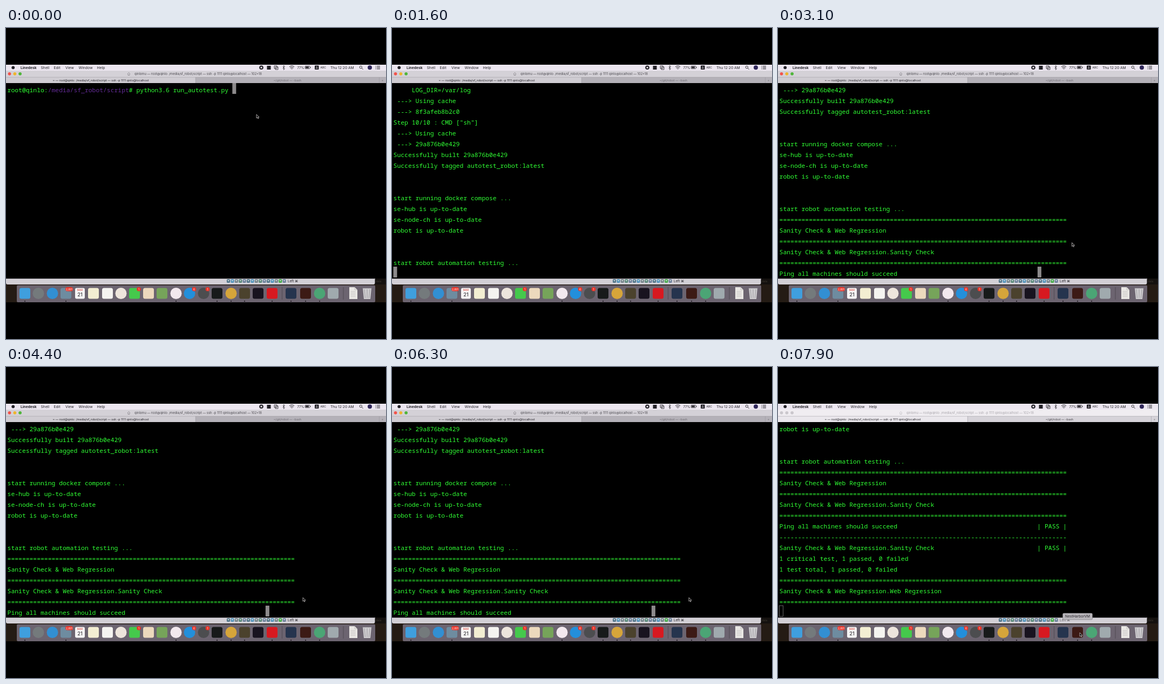
An HTML page for the animation above (8 s loop, 704 px wide and 576 px high).

```html
<!DOCTYPE html>
<html lang="en">
<head>
<meta charset="utf-8">
<title>Automated test run</title>
<style>
html, body { margin: 0; width: 100%; height: 100%; overflow: hidden; background: #000; }
svg { display: block; width: 100%; height: 100%; }
text { white-space: pre; font-family: Inter, "Noto Sans", sans-serif; }
.term { font: 500 11.39px "Noto Sans Mono", "DejaVu Sans Mono", monospace; fill: #30ff34; }
</style>
</head>
<body>
<svg id="stage" viewBox="0 0 704 576"></svg>
<script>
const LOOP = 8000, CHAR = 6.835, LEFT = 2.6, ROW = 20, TOP = 102;
const INK = '#242228';
const stage = document.getElementById('stage');

function add(tag, attrs, parent = stage) {
  const el = document.createElementNS('http://www.w3.org/2000/svg', tag);
  for (const key in attrs) el.setAttribute(key, attrs[key]);
  parent.appendChild(el);
  return el;
}
const rect = (x, y, width, height, fill, more) => add('rect', { x, y, width, height, fill, ...more });
const circle = (cx, cy, r, fill, more) => add('circle', { cx, cy, r, fill, ...more });
const path = (d, stroke, more) => add('path', { d, stroke, fill: 'none', ...more });
function label(x, y, content, size, fill = INK, more = {}) {
  const el = add('text', { x, y, 'font-size': size, fill, ...more });
  el.textContent = content;
  return el;
}
const middle = { 'text-anchor': 'middle' };

function drawMenuBar() {
  rect(0, 68, 704, 11, '#ece6f0');
  circle(13.2, 73.3, 2.9, INK);
  label(27, 75.8, 'Linedesk', 6.7, INK, { 'font-weight': 700 });
  [['Shell', 64.5], ['Edit', 88.5], ['View', 110], ['Window', 134.5], ['Help', 168.5]]
    .forEach(([name, x]) => label(x, 75.8, name, 6.8));
  circle(473, 73.3, 3.8, INK);
  rect(471.6, 71.9, 2.8, 2.8, '#ece6f0');
  rect(483.5, 70, 7, 7, INK);
  path('M497 70h5v5h-5zM499 72h5v5h-5z', INK, { 'stroke-width': .8 });
  path('M512.5 71.5l4 4-2 2v-8l2 2-4 4', INK, { 'stroke-width': .7 });
  path('M525 72q4.5-3.8 9 0M526.5 74q3-2.5 6 0M528.3 75.8q1.2-1 2.4 0', INK, { 'stroke-width': 1 });
  label(539.5, 75.5, '77%', 6.2);
  rect(554, 70.5, 9, 5, 'none', { stroke: INK, 'stroke-width': .7, rx: 1 });
  rect(555, 71.5, 6, 3, INK);
  rect(563.4, 72, 1, 2, INK);
  rect(572, 69.5, 7.5, 7.5, INK, { rx: 1 });
  label(575.8, 75.5, 'A', 5.6, '#ece6f0', middle);
  label(582.5, 75.3, 'ABC', 5);
  label(601, 75.8, 'Thu 12:20 AM', 6.7);
  circle(657.3, 72.6, 2.2, 'none', { stroke: INK, 'stroke-width': .9 });
  path('M659 74.3l2.5 2.5', INK, { 'stroke-width': 1 });
  circle(674, 73.2, 4, '#30275a');
  path('M684.5 70.8h1.3M687 70.8h6M684.5 73.3h1.3M687 73.3h6M684.5 75.8h1.3M687 75.8h6', INK, { 'stroke-width': 1 });
}

function drawWindow() {
  const parts = {};
  parts.title = rect(0, 79, 704, 12);
  parts.lights = ['#f2534b', '#eeb52d', '#4fb53b'].map((color, i) =>
    ({ color, el: circle(6.5 + i * 9.8, 84.8, 2.9, color) }));
  parts.home = path('M225 85l2.5-2.5 2.5 2.5M226 85v2.5h3v-2.5', '#77757a', { 'stroke-width': .7 });
  parts.caption = label(356, 87.1,
    'qinlomu — root@qinlo: /media/sf_robot/script — ssh -p 1111 qinlo@localhost — 102×18',
    5.8, INK, middle);
  parts.tab = rect(0, 91, 351, 11);
  parts.backTab = rect(351, 91, 353, 11);
  path('M0 91.2H704M351.3 91v11M691.5 91v11', '#98959c', { 'stroke-width': .5 });
  label(175.5, 98.7, '~ — root@qinlo: /media/sf_robot/script — ssh -p 1111 qinlo@localhost', 5.45, INK, middle);
  parts.backLabel = label(521.5, 98.7, '~/git/robot — -bash', 5.45, INK, middle);
  label(697.5, 98.5, '+', 6, '#77757a', middle);
  rect(0, 102, 704, 362, '#000');
  return parts;
}

function drawStatusStrip() {
  rect(0, 464, 704, 44, '#241b14');
  rect(0, 464, 704, 11, '#14110f');
  add('path', { d: 'M0 464.5H683.5V472q0 3-3 3H3q-3 0-3-3z', fill: '#d2cfd5' });
  rect(0, 464, 684, 1, '#a5a2a8');
  const tints = ['#4c7186', '#4b91bc', '#718087', '#528575', '#667b99'];
  for (let i = 0; i < 15; i++) {
    rect(409 + i * 7.4, 465.2, 6, 6.6, i === 13 ? '#3daa42' : tints[i % 5], { rx: 1.5 });
    rect(410.7 + i * 7.4, 467, 2.5, 2, '#d2dad8');
  }
  const key = label(522, 471, 'Left ⌘', 6.2);
  label(685, 471, 'data', 5, '#3d3830');
  return key;
}

function badge(x, content) {
  const width = content.length > 1 ? 14 : 7.6;
  rect(x - width / 2, 480, width, 7.6, '#ec3429', { rx: 3.8 });
  label(x, 485.8, content, 4.8, '#fff', middle);
}

function drawDock() {
  rect(20, 476.5, 664, 31.5, '#6c6470', { rx: 2 });
  const apps = [
    [35, 'square', '#3f9fde'], [60, 'round', '#747a7c'], [86, 'round', '#328fd2'], [111, 'square', '#6e8ca0'],
    [162, 'square', '#f3eed2'], [188, 'square', '#f4f3f0'], [213, 'round', '#ede5dc'],
    [238, 'square', '#45c94c'], [264, 'square', '#ecd9bd'], [289, 'square', '#76a45a'], [315, 'round', '#f2e8ee'],
    [340, 'round', '#238fdb'], [366, 'round', '#4c4d4f'], [391, 'square', '#171a1a'], [417, 'round', '#d6a53a'],
    [442, 'square', '#4b422d'], [467, 'square', '#18131f'], [493, 'square', '#d71920'], [528, 'square', '#25344e'],
    [555, 'square', '#3c1a15'], [581, 'round', '#4ba575'], [606, 'square', '#a0aaae']
  ];
  apps.forEach(([x, shape, fill]) => shape === 'round'
    ? circle(x, 491.5, 10.5, fill)
    : rect(x - 10, 481.5, 20, 20, fill, { rx: 3.5 }));

  rect(128, 481.5, 18, 20, '#f6f4f4', { rx: 3 });
  label(137, 487.3, 'MAR', 4.6, '#dc3c31', middle);
  label(137, 497, '21', 9.5, INK, middle);

  [[117, '2,891'], [246, '1'], [348.5, '6'], [373.5, '1']].forEach(args => badge(...args));
  path('M511.5 480v23M625 480v23', '#4b454d', { 'stroke-width': .8 });

  add('path', { d: 'M636 480h10l5 5v17h-15z', fill: '#e9e7e4' });
  path('M646 480v5h5M638.5 488h9M638.5 491h9M638.5 494h9M638.5 497h9', '#b5b2b2', { 'stroke-width': .7 });
  add('path', { d: 'M661 482h16l-2 20h-12z', fill: '#cfcdd0' });
  path('M660.5 482h17M664 484l1.5 16M669 484v16M674 484l-1.5 16', '#959398', { 'stroke-width': .9 });
  [35, 111, 315, 391, 417, 442, 493, 528, 555, 581].forEach(x => circle(x, 506, 1, '#141114'));
}

const rule = '='.repeat(78);
const ping = 'Ping all machines should succeed'.padEnd(70);
const output = [
  '     LOG_DIR=/var/log',
  ' ---> Using cache',
  ' ---> 8f3afeb8b2c0',
  'Step 10/10 : CMD ["sh"]',
  ' ---> Using cache',
  ' ---> 29a876b0e429',
  'Successfully built 29a876b0e429',
  'Successfully tagged autotest_robot:latest',
  '', '',
  'start running docker compose ...',
  'se-hub is up-to-date',
  'se-node-ch is up-to-date',
  'robot is up-to-date',
  '', '',
  'start robot automation testing ...',
  rule, 'Sanity Check & Web Regression',
  rule, 'Sanity Check & Web Regression.Sanity Check',
  rule, ping + '| PASS |',
  '-'.repeat(78),
  'Sanity Check & Web Regression.Sanity Check'.padEnd(70) + '| PASS |',
  '1 critical test, 1 passed, 0 failed',
  '1 test total, 1 passed, 0 failed',
  rule, 'Sanity Check & Web Regression.Web Regression',
  rule
];

// Each screen: start time, first visible line, lines printed, cursor row and column.
const screens = [
  { at: 0, prompt: true, row: 0, col: 61 },
  { at: 300, prompt: true, row: 1, col: 0 },
  { at: 700, first: -6, count: 11, row: 17, col: 0 },
  { at: 1300, first: 0, count: 17, row: 17, col: 0 },
  { at: 2300, first: 5, count: 23, row: 17, col: 70, waiting: true },
  { at: 6700, first: 13, count: 30, row: 17, col: 0 }
];

const track = [
  [0, 464, 160], [2700, 530, 350], [3100, 544.5, 397.5], [3500, 550, 427],
  [6300, 550, 427], [7000, 548, 456], [7100, 548, 456], [7500, 559, 492], [8000, 559, 492]
];

function pointerAt(t) {
  if (t < 2700) return [464, 160];
  const i = track.findIndex(point => point[0] > t);
  const [t0, x0, y0] = track[i - 1], [t1, x1, y1] = track[i];
  const p = (t - t0) / (t1 - t0), eased = p * p * (3 - 2 * p);
  return [x0 + (x1 - x0) * eased, y0 + (y1 - y0) * eased];
}

drawMenuBar();
const win = drawWindow();
const caret = rect(0, 0, 7, 20);
const rows = Array.from({ length: 18 }, (_, i) =>
  add('text', { x: LEFT, y: TOP + 17.3 + i * ROW, class: 'term' }));
const prompt = add('text', { x: LEFT, y: TOP + 17.3, class: 'term' });
[['root@qinlo:'], ['/media/sf_robot/script', '#642c98'], ['# python3.6 run_autotest.py ']].forEach(([content, color]) => {
  const span = add('tspan', color ? { fill: color } : {}, prompt);
  span.textContent = content;
});
const hostKey = drawStatusStrip();
drawDock();

const tooltip = add('g', {});
tooltip.append(
  rect(527.5, 456, 55, 12, '#b8b5ba', { rx: 2, stroke: '#757278', 'stroke-width': .6 }),
  label(555, 464.4, 'NestHarborVM', 6.5, INK, middle)
);
const pointer = add('path', {
  d: 'M0 0v7l1.7-1.5 1.2 2.5 1.1-.5-1.2-2.4h2.3z',
  fill: '#0c0c0c', stroke: '#c8c5c4', 'stroke-width': .8
});

const show = (el, visible) => el.setAttribute('display', visible ? 'inline' : 'none');
const fill = (el, color) => el.setAttribute('fill', color);

let shownScreen;
function drawScreen(screen) {
  if (screen === shownScreen) return;
  shownScreen = screen;
  show(prompt, screen.prompt);
  rows.forEach((row, i) => {
    const index = screen.first + i;
    const printed = !screen.prompt && index >= 0 && index < screen.count;
    const isWaiting = screen.waiting && index === screen.count - 1;
    row.textContent = !printed ? '' : isWaiting ? ping : output[index];
  });
  caret.setAttribute('x', LEFT - .2 + screen.col * CHAR);
  caret.setAttribute('y', TOP + screen.row * ROW);
}

function setFocus(active) {
  fill(win.title, active ? '#d4d1d7' : '#f0edf1');
  fill(win.tab, active ? '#cfccd2' : '#eae7ec');
  fill(win.backTab, active ? '#b4b1b8' : '#d6d3d9');
  fill(win.caption, active ? '#4c4a50' : '#aaa7ad');
  fill(win.backLabel, active ? '#706d74' : '#454248');
  win.home.setAttribute('stroke', active ? '#77757a' : '#bbb9be');
  win.lights.forEach(({ el, color }) => fill(el, active ? color : '#cac7cc'));
  fill(caret, active ? '#8c8a8b' : 'none');
  caret.setAttribute('stroke', active ? 'none' : '#696768');
  fill(hostKey, active ? INK : '#646166');
}

function render(t) {
  drawScreen(screens.filter(screen => screen.at <= t).pop());
  setFocus(t < 7700);
  show(tooltip, t >= 7500);
  show(pointer, t < 300 || t >= 2700);
  pointer.setAttribute('transform', `translate(${pointerAt(t)})`);
}

const start = performance.now();
function tick() {
  const elapsed = (performance.now() - start) % LOOP;
  render(Math.floor(elapsed / 100) * 100);
  requestAnimationFrame(tick);
}
tick();
</script>
</body>
</html>
```
